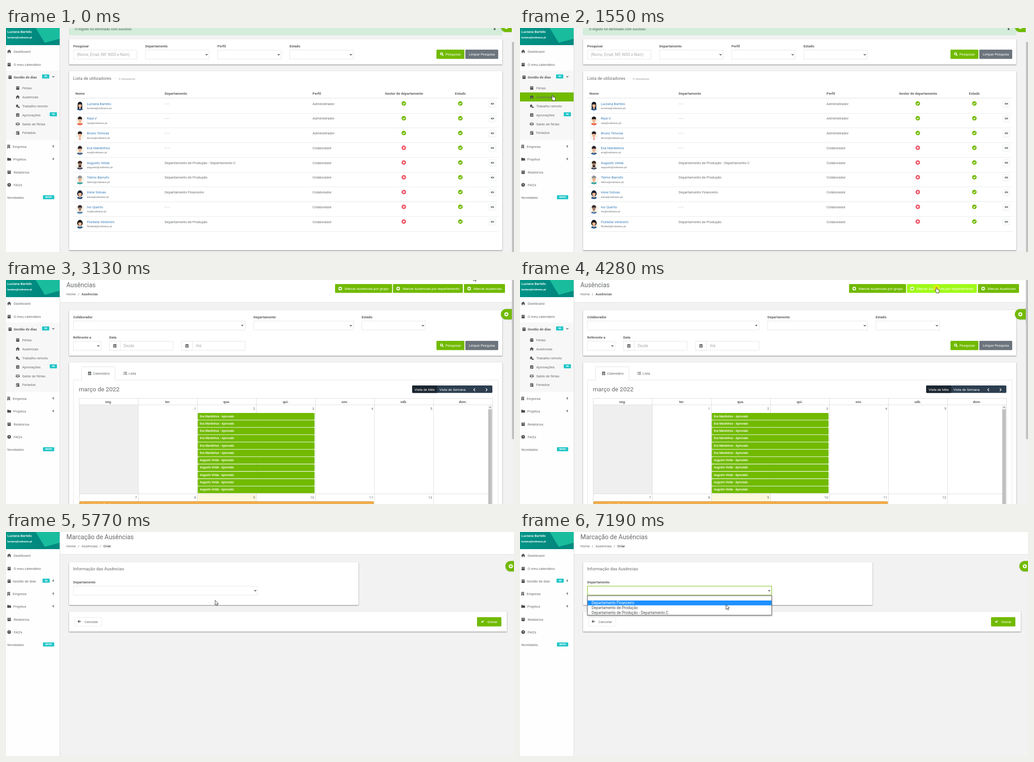
An HTML page with a canvas that plays this animation: 1127 px wide and 497 px high, repeating every 8000 ms.

```html
<!DOCTYPE html>
<html lang="pt">
<head>
<meta charset="utf-8">
<title>Gestão de ausências</title>
<style>
html, body { margin: 0; width: 100%; height: 100%; overflow: hidden; background: #f2f2f2; }
canvas { display: block; }
</style>
</head>
<body>
<canvas id="stage" width="1127" height="497"></canvas>
<script>
const ctx = document.getElementById('stage').getContext('2d');
const LOOP = 8000;
const GREEN = '#71ba00', GREY = '#676a6c', DARK = '#4d5052', TEAL = '#23c6c8', LINE = '#e5e6e7', LINK = '#337ab7';

const USERS = [
  // name, mail, department, profile, hair, shirt, hair style
  ['Luciana Bartelo', 'luciana', '- - -', 'Administrador', '#161c28', '#1d4e89', 'long'],
  ['Raul V', 'raul', '- - -', 'Administrador', '#1d1a1e', '#ee5a45', 'short'],
  ['Bruno Teivosa', 'bruno', '- - -', 'Administrador', '#201c20', '#f4f4f4', 'tie'],
  ['Eva Mardinhos', 'eva', '- - -', 'Colaborador', '#2a2530', '#24578f', 'bun'],
  ['Augusto Velda', 'augusto', 'Departamento de Produção - Departamento C', 'Colaborador', '#3b2a25', '#3d4a5c', 'beard'],
  ['Telmo Barrufo', 'telmo', 'Departamento de Produção', 'Colaborador', '#8e9496', '#27a3a3', 'short'],
  ['Irene Solvas', 'irene', 'Departamento Financeiro', 'Colaborador', '#1a2030', '#1f4d86', 'curly'],
  ['Ivo Querto', 'ivo', '- - -', 'Colaborador', '#3a3032', '#4a7fb0', 'glasses'],
  ['Florbela Ventorim', 'florbela', 'Departamento de Produção', 'Colaborador', '#101218', '#1d5a8c', 'bob'],
];
const DOMAIN = '@vobrano.pt';

const CAL = 'M-3.5-3H-2.2V-4.2H-1V-3H1V-4.2H2.2V-3H3.5V4H-3.5ZM-3-1.2H3V-.5H-3Z';
const HOME = 'M-4.6 0L0-4L4.6 0H3.3V3.8H1V1H-1V3.8H-3.3V0Z';
const ICONS = {
  cal: CAL,
  home: HOME,
  calCheck: CAL + 'M-2 1.2L-.5 2.8L2.2 .6L1.6 0L-.5 1.6L-1.3 .6Z',
  calDay: CAL + 'M-2.4 .4H-.2V2.4H-2.4Z',
  grid: CAL + 'M-2.4 .2H-1V1.3H-2.4ZM-.6 .2H.6V1.3H-.6ZM1 .2H2.4V1.3H1ZM-2.4 2H-1V3H-2.4ZM-.6 2H.6V3H-.6ZM1 2H2.4V3H1Z',
  remote: 'M-4.6-.4L-1.2-3.6L2.2-.4H1V1H-.4V2.6H-3.6V-.4ZM.4 1.4H4V3.2H4.8V4H-.4V3.2H.4Z',
  scale: 'M-4-3H4V-2.2H.5V3H2.5V3.8H-2.5V3H-.5V-2.2H-4ZM-4.8 1L-3-2L-1.2 1A1.8 1.3 0 0 1-4.8 1ZM1.2 1L3-2L4.8 1A1.8 1.3 0 0 1 1.2 1Z',
  building: 'M-3-4H3V4H1V2H-1V4H-3ZM-2-3H-.6V-1.8H-2ZM.6-3H2V-1.8H.6ZM-2-1H-.6V.4H-2ZM.6-1H2V.4H.6Z',
  folder: 'M-4.2-3H-1L0-2H4.2V3.3H-4.2Z',
  box: 'M-4-3.5H4V-1.6H-4ZM-3.6-1H3.6V3.7H-3.6ZM-1.2-.2V.6H1.2V-.2Z',
  list: 'M-4-3H-2.6V-1.8H-4ZM-1.8-2.9H4V-1.9H-1.8ZM-4-.6H-2.6V.6H-4ZM-1.8-.5H4V.5H-1.8ZM-4 1.8H-2.6V3H-4ZM-1.8 1.9H4V2.9H-1.8Z',
  eye: 'M-4 0Q0-4.4 4 0Q0 4.4-4 0ZM-1.7 0A1.7 1.7 0 0 0 1.7 0A1.7 1.7 0 0 0-1.7 0ZM-.8 0A.8 .8 0 0 0 .8 0A.8 .8 0 0 0-.8 0Z',
};
const GLYPHS = {
  plus: 'M-2.6 0H2.6M0-2.6V2.6',
  check: 'M-2.4 .1L-.7 1.8L2.5-1.5',
  cross: 'M-1.7-1.7L1.7 1.7M1.7-1.7L-1.7 1.7',
  down: 'M-2.3-1.1L0 1.2L2.3-1.1',
  left: 'M1.1-2.3L-1.2 0L1.1 2.3',
  right: 'M-1.5-3L1.5 0L-1.5 3',
  prev: 'M1.5-3L-1.5 0L1.5 3',
  arrow: 'M3.3 0H-3M-.3-2.8L-3.1 0L-.3 2.8',
  search: 'M1.5-.7A2.3 2.3 0 1 1-3.1-.7A2.3 2.3 0 1 1 1.5-.7M.9 .9L3.4 3.4',
};
const ARROW = new Path2D('M0 0V10.6L2.5 8.3L4.2 12L5.9 11.2L4.3 7.7H7.4Z');
const HAND = new Path2D('M-1.2 6.5V.9A1.1 1.1 0 0 1 1 .9V4L5 4.8Q6.3 5.2 6.1 7L5.4 11V12.5H0V11L-3.2 7.2Q-3.4 5.7-2 6.2Z');

// pointer path: time, x, y
const POINTER = [
  [220, 280, 500], [600, 149, 70.5], [680, 149, 70.5], [920, 62, 138], [1080, 62, 138],
  [1150, 66, 145], [1310, 66, 145], [1400, 70, 139], [1550, 72.5, 149], [2730, 72.5, 149],
  [3130, 1037, -9], [3200, 1037, -9], [3520, 900, 15], [3580, 900, 15], [3660, 924, 16.5],
  [5500, 924, 16.5], [5770, 464, 151.5], [5850, 464, 151.5], [6120, 472, 132], [6320, 472, 132],
  [6640, 461, 162.5], [6780, 460, 162.5], [6950, 459.5, 163], [7180, 459.5, 163], [7190, 457, 161],
];

let fontsReady = true;

function rect(x0, y0, x1, y1, fill, radius = 0, stroke) {
  ctx.beginPath();
  ctx.roundRect(x0, y0, x1 - x0, y1 - y0, radius);
  if (fill) { ctx.fillStyle = fill; ctx.fill(); }
  if (stroke) { ctx.strokeStyle = stroke; ctx.lineWidth = 1; ctx.stroke(); }
}
function outline(x0, y0, x1, y1, stroke = LINE, fill = '#fff', radius = 0) {
  rect(x0 + .5, y0 + .5, x1 - .5, y1 - .5, fill, radius, stroke);
}
function card(x0, y0, x1, y1) {
  ctx.save();
  ctx.shadowColor = 'rgba(0,0,0,.5)';
  ctx.shadowBlur = 2;
  ctx.shadowOffsetY = 1;
  rect(x0, y0, x1, y1, '#fff');
  ctx.restore();
}
function shape(points, fill) {
  ctx.beginPath();
  points.forEach(([x, y]) => ctx.lineTo(x, y));
  ctx.fillStyle = fill;
  ctx.fill();
}
function ellipse(x, y, rx, ry, fill) {
  ctx.beginPath();
  ctx.ellipse(x, y, rx, ry, 0, 0, 7);
  ctx.fillStyle = fill;
  ctx.fill();
}
function say(str, x, y, { size = 7.75, color = GREY, weight = 400, align = 'left' } = {}) {
  if (!fontsReady) return;
  ctx.font = `${weight} ${size}px Roboto, sans-serif`;
  ctx.fillStyle = color;
  ctx.textAlign = align;
  ctx.fillText(str, x, y + size * .35);
}
const bold = (str, x, y, more) => say(str, x, y, { weight: 700, color: '#5d6062', ...more });

function at(x, y, draw) {
  ctx.save();
  ctx.translate(x, y);
  draw();
  ctx.restore();
}
function icon(name, x, y, color = DARK) {
  if (!fontsReady) return;
  at(x, y, () => { ctx.fillStyle = color; ctx.fill(new Path2D(ICONS[name]), 'evenodd'); });
}
function glyph(name, x, y, color = '#333', width = 1.3) {
  at(x, y, () => { ctx.strokeStyle = color; ctx.lineWidth = width; ctx.stroke(new Path2D(GLYPHS[name])); });
}
function disc(name, x, y, r, fill, color) {
  if (!fontsReady) return;
  ellipse(x, y, r, r, fill);
  glyph(name, x, y, color, 1.4);
}
function badge(str, x0, y0, x1) {
  rect(x0, y0, x1, y0 + 9, TEAL, 1);
  say(str, (x0 + x1) / 2, y0 + 4.5, { size: 5.4, weight: 700, color: '#fff', align: 'center' });
}
function field(x0, y0, x1, chevron = true, border = LINE) {
  outline(x0, y0, x1, y0 + 21, border);
  if (chevron) glyph('down', x1 - 6, y0 + 10.5);
}
function searchButtons(y) {
  rect(955, y, 1017, y + 20.5, GREEN, 1.5);
  if (fontsReady) glyph('search', 967, y + 10, '#fff', 1.5);
  say('Pesquisar', 975, y + 10, { color: '#fff' });
  rect(1019, y, 1092, y + 20.5, '#6c757d', 1.5);
  say('Limpar Pesquisa', 1027, y + 10, { color: '#fff' });
}
function floatingAdd(x, y, right) {
  ctx.save();
  ctx.shadowColor = 'rgba(0,0,0,.3)';
  ctx.shadowBlur = 2;
  rect(x - 12, y - 11.5, right + 12, y + 11.5, GREEN, 11.5);
  ctx.restore();
  disc('plus', x, y, 4.6, '#fff', GREEN);
}
function scrollbar(y0, y1) {
  rect(1122, 0, 1127, 497, '#f1f1f1');
  rect(1122.5, y0, 1127, y1, '#c1c1c1');
}

function sidebar(open, pointer) {
  rect(0, 0, 119, 497, '#fefefe');
  rect(119, 0, 120, 497, '#dcdcdc');
  const teal = ctx.createLinearGradient(0, 0, 119, 38);
  teal.addColorStop(0, '#009688');
  teal.addColorStop(1, '#007f78');
  rect(0, 0, 119, 38, teal);
  shape([[66, 0], [86, 33], [119, 24], [119, 0]], '#19bc9d');
  shape([[86, 33], [119, 24], [119, 38], [89, 38]], '#008a80');
  say(USERS[0][0], 3, 8, { weight: 500, color: '#fff' });
  say(USERS[0][1] + DOMAIN, 3, 20.5, { weight: 700, size: 6.1, color: '#fff' });

  icon('home', 7, 52);
  say('Dashboard', 17, 52);
  icon('cal', 7, 81);
  say('O meu calendário', 17, 81);
  if (open) {
    rect(0, 94, 119, 248.5, '#f7f7f7');
    icon('cal', 9, 109);
    bold('Gestão de dias', 17, 109);
    badge('46', 80, 103, 96);
    glyph('down', 105, 108, DARK);
    const items = [['cal', 'Férias'], ['home', 'Ausências'], ['remote', 'Trabalho remoto'],
      ['calCheck', 'Aprovações'], ['scale', 'Saldo de férias'], ['calDay', 'Feriados']];
    items.forEach(([name, label], i) => {
      const y = 133 + i * 19.95;
      const hovered = pointer && pointer.x < 119 && Math.floor((pointer.y - 123) / 20) === i;
      if (hovered) rect(0, 123 + i * 20, 119, 143 + i * 20, GREEN);
      icon(name, 26, y);
      say(label, 36, y);
    });
    badge('46', 97, 187, 113);
  } else {
    icon('cal', 7, 109);
    say('Gestão de dias', 15, 109);
    badge('46', 81, 103.5, 97);
    glyph('left', 105, 108, DARK);
  }
  const y = open ? 263 : 137;
  icon('building', 6, y);
  say('Empresa', 15, y);
  icon('folder', 7, y + 28);
  say('Projetos', 16, y + 28);
  glyph('left', 105, y - .5, DARK);
  glyph('left', 105, y + 27.5, DARK);
  icon('box', 7, y + 57);
  say('Relatórios', 17, y + 57);
  if (fontsReady) ellipse(7, y + 85, 4, 4, DARK);
  say('?', 7, y + 85, { size: 6, weight: 700, color: '#fff', align: 'center' });
  say("FAQ's", 17, y + 85);
  say('Novidades', 3, y + 113.5);
  badge('NOVO', 82, y + 108, 107);
}

function avatar(x, y, hair, shirt, style) {
  const skin = '#efb894';
  ctx.save();
  ctx.beginPath();
  ctx.arc(x, y, 10, 0, 7);
  ctx.fillStyle = '#f6f5ee';
  ctx.fill();
  ctx.clip();
  if (style === 'long') rect(x - 5, y - 8, x + 5, y + 7, hair, [5, 5, 2, 2]);
  if (style === 'bob' || style === 'curly') ellipse(x, y - 2, 6, 6.2, hair);
  if (style === 'bun') ellipse(x, y - 8, 2.2, 2.2, hair);
  ellipse(x, y + 10, 8, 5, shirt);
  rect(x - 1.5, y + 2, x + 1.5, y + 7, skin);
  ellipse(x, y - 5, 4.7, 4.3, hair);
  ellipse(x, y - 1, 3.7, 4.9, skin);
  rect(x - 3.7, y - 7, x + 3.7, y - 3.6, hair, [3, 3, 1, 1]);
  if (style === 'tie') shape([[x, y + 5], [x + 1.4, y + 10], [x - 1.4, y + 10]], '#e9573f');
  if (style === 'beard') ellipse(x, y + 2.4, 3.3, 2.3, hair);
  if (style === 'glasses') rect(x - 2, y + .8, x + 2, y + 1.9, hair);
  if (style === 'glasses' || style === 'beard') rect(x - 3.2, y - 2.2, x + 3.2, y - 1, '#444');
  ctx.restore();
}

function usersPage(pointer) {
  outline(140, -20, 1101, 15.5, '#c3e6cb', '#d4edda');
  say('O registo foi eliminado com sucesso', 153, 2.2, { color: '#4c5f52' });
  glyph('cross', 1084, 2.5, '#444', 1.5);
  floatingAdd(1110, -2.5, 1122);
  scrollbar(31, 497);

  card(140, 25, 1101, 81);
  ['Pesquisar', 'Departamento', 'Perfil', 'Estado'].forEach((label, i) => {
    bold(label, 149 + i * 160, 40);
    field(149 + i * 160, 48.5, 291 + i * 160, i > 0);
  });
  say('(Nome, Email, NIF, NISS e Núm)', 157, 59, { size: 8.4, color: '#a9abad' });
  searchButtons(48);

  card(140, 96, 1101, 493);
  say('Lista de utilizadores', 149, 111.5, { size: 9.5 });
  say('•', 241, 112, { size: 6, color: '#aaa' });
  say('9 Utilizadores', 250, 112.5, { size: 6.1, color: '#999' });
  bold('Nome', 154, 145.5);
  bold('Departamento', 352, 145.5);
  bold('Perfil', 680, 145.5);
  bold('Gestor de departamento', 883, 145.5, { align: 'center' });
  bold('Estado', 1008, 145.5, { align: 'center' });
  rect(149, 155, 1092, 156, '#dedede');
  USERS.forEach(([name, mail, department, profile, hair, shirt, style], i) => {
    const y = 168 + i * 32.75, top = y - 12, bottom = y + 20.5;
    if (pointer && pointer.x > 149 && pointer.y > top && pointer.y < bottom) rect(149, top, 1092, bottom, '#f5f5f5');
    rect(149, Math.round(bottom), 1092, Math.round(bottom) + 1, '#e7eaec');
    avatar(164, y + 5, hair, shirt, style);
    say(name, 179.5, y, { color: LINK });
    say(mail + DOMAIN, 179.5, y + 10, { size: 6.2 });
    say(department, 352, y);
    say(profile, 680, y);
    if (i < 3) disc('check', 882.5, y - .5, 5, GREEN, '#fff');
    else disc('cross', 882.5, y - .5, 5, '#ed5565', '#fff');
    disc('check', 1008, y - .5, 5, GREEN, '#fff');
    outline(1071, Math.round(y) - 7, 1087, Math.round(y) + 8, '#e7eaec', '#fff', 1);
    icon('eye', 1079, y);
  });
}

function pageHead(title, crumbs, right) {
  rect(120, 0, right, 49, '#fff');
  rect(120, 49, right, 50, '#e2e3e4');
  say(title, 134, 11.5, { size: 14 });
  crumbs.forEach(([x, label], i) => {
    const draw = i === crumbs.length - 1 ? bold : say;
    if (i) say('/', x - 8, 31);
    draw(label, x, 31);
  });
}

function calendar() {
  card(140, 183, 1101, 510);
  rect(149, 221.5, 150, 497, LINE);
  rect(1091, 221.5, 1092, 497, LINE);
  rect(149, 221.5, 1092, 222.5, LINE);
  outline(167, 192, 242.5, 226, '#dee2e6', '#fff', 2);
  rect(166, 222.5, 244, 228, '#fff');
  icon('grid', 185.5, 207);
  say('Calendário', 193, 207);
  icon('list', 264.5, 207);
  say('Lista', 272, 207);
  say('março de 2022', 161.5, 242, { size: 13.5 });
  rect(901, 234, 1079, 250.5, '#2c3e50', 2);
  rect(901, 234, 956.5, 250.5, '#1a252f', [2, 0, 0, 2]);
  say('Vista de Mês', 906.5, 243, { color: '#fff' });
  say('Vista de Semana', 961.5, 243, { color: '#fff' });
  glyph('prev', 1039, 243.5, '#fff');
  glyph('right', 1066, 243.5, '#fff');

  rect(162, 277, 293, 474, '#efefef');
  rect(424, 474, 555, 497, '#fcf8dd');
  [262, 276.5, 474].forEach(y => rect(162, y, 1079, y + 1, '#ddd'));
  const days = ['seg.', 'ter.', 'qua.', 'qui.', 'sex.', 'sáb.', 'dom.'];
  for (let i = 0; i <= 7; i++) rect(162 + i * 131, 262, 163 + i * 131, 497, '#ddd');
  days.forEach((day, i) => {
    const right = 290.5 + i * 131;
    bold(day, 227.5 + i * 131, 270, { align: 'center' });
    if (i > 0 && i < 6) say(i, right, 285.5, { align: 'right' });
    if (i < 6) say(i + 7, right, 482.5, { align: 'right' });
  });
  rect(1069, 277, 1078.5, 497, '#f1f1f1');
  rect(1070, 287, 1078, 497, '#c1c1c1');
  shape([[1071.5, 283.5], [1074, 281], [1076.5, 283.5]], '#777');
  for (let i = 0; i < 11; i++) {
    const y = 295 + i * 16.27;
    rect(425.5, y, 684.5, y + 15.2, GREEN, 1.5);
    say(`${USERS[i < 6 ? 3 : 4][0]} - Aprovado`, 430, y + 7.3, { size: 6.5, weight: 500, color: '#fff' });
  }
  outline(163, 491, 816, 507, '#d99a3a', '#f0ad4e', 1.5);
  say(`${USERS[4][0]} - Pendente`, 168, 498.5, { size: 6.5, weight: 500, color: '#fff' });
}

function absencesPage(t) {
  pageHead('Ausências', [[134, 'Home'], [167.5, 'Ausências']], 1122);
  const flash = t < 4280 ? 0 : Math.max(0, 1 - (t - 4280) / 320);
  const lit = `rgb(${113 + 47 * flash},${186 + 64 * flash},${24 * flash})`;
  [[730, 856.5, 'por grupo'], [858.5, 1013.5, 'por departamento'], [1016, 1107, '']].forEach(([x0, x1, tail], i) => {
    rect(x0, 9, x1, 28.5, i === 1 ? lit : GREEN, 1.5);
    disc('plus', x0 + 11.5, 19, 4, '#fff', GREEN);
    say(`Marcar Ausências ${tail}`.trim(), x0 + 21.5, 19, { color: '#fff' });
  });
  if (flash) ellipse(924, 17.5, 7, 7, `rgba(235,235,0,${.8 * flash})`);
  scrollbar(0, 353);

  card(140, 67, 1101, 168);
  bold('Colaborador', 149, 82);
  bold('Departamento', 549, 82);
  bold('Estado', 789, 82);
  field(149, 90.5, 531, false);
  shape([[521.5, 99.5], [527, 99.5], [524.2, 103]], '#666');
  field(549, 90.5, 771);
  field(789, 90.5, 931);
  bold('Referente a', 149, 127);
  bold('Data', 229, 127);
  field(149, 135.5, 211);
  [[229, 'Desde'], [389, 'Até']].forEach(([x, hint]) => {
    field(x, 135.5, x + 142, false);
    field(x, 135.5, x + 25, false);
    icon('grid', x + 12.5, 146);
    say(hint, x + 32, 146, { size: 8.4, color: '#a9abad' });
  });
  searchButtons(135);
  floatingAdd(1110, 76, 1122);
  if (t >= 2420) calendar();
  rect(1122, 60, 1127, 95, '#c1c1c1');
}

function createPage(t, pointer) {
  pageHead('Marcação de Ausências', [[134, 'Home'], [167.5, 'Ausências'], [216, 'Criar']], 1127);
  floatingAdd(1120, 76, 1140);
  card(140, 67, 782, 162);
  say('Informação das Ausências', 149, 82, { size: 9.5 });
  bold('Departamento', 149, 111);
  const open = t >= 6200;
  field(149, 119.5, 559, true, open ? GREEN : LINE);

  card(140, 177, 1111, 221);
  outline(152, 189, 213, 209.5, '#e7eaec', '#fff', 1.5);
  if (fontsReady) glyph('arrow', 163, 198.5, DARK);
  say('Cancelar', 174, 199);
  rect(1045, 189, 1099, 209.5, GREEN, 1.5);
  if (fontsReady) glyph('check', 1057, 198.5, '#fff', 1.8);
  say('Gravar', 1068, 199, { color: '#fff' });

  if (!open) return;
  ctx.save();
  ctx.shadowColor = 'rgba(0,0,0,.3)';
  ctx.shadowBlur = 3;
  ctx.shadowOffsetY = 1;
  outline(149, 140.5, 559, 185, '#666');
  ctx.restore();
  const picked = Math.max(0, Math.floor((pointer.y - 141) / 10.7));
  ['', 'Departamento Financeiro', 'Departamento de Produção', 'Departamento de Produção - Departamento C'].forEach((option, i) => {
    const y = 141.3 + i * 10.7;
    if (i === picked) rect(150, y, 558, y + 10.7, '#1e90ff');
    say(option, 159, y + 5.3, { size: 8.4, color: i === picked ? '#fff' : '#4a4d50' });
  });
}

function pointerAt(t) {
  if (t < POINTER[0][0]) return null;
  const next = POINTER.findIndex(key => key[0] > t);
  if (next < 0) { const [, x, y] = POINTER.at(-1); return { x, y }; }
  const [t0, x0, y0] = POINTER[next - 1], [t1, x1, y1] = POINTER[next];
  const u = (t - t0) / (t1 - t0), k = u * u * (3 - 2 * u);
  return { x: x0 + (x1 - x0) * k, y: y0 + (y1 - y0) * k };
}

function drawPointer({ x, y }, page) {
  const onLink = page < 3 && x < 119 || page === 2 && x > 730 && x < 1107 && y > 9 && y < 28;
  const path = onLink ? HAND : ARROW;
  at(x, y, () => {
    ctx.fillStyle = '#fff';
    ctx.strokeStyle = '#222';
    ctx.lineWidth = .9;
    ctx.fill(path);
    ctx.stroke(path);
  });
}

function frame() {
  const t = performance.now() % LOOP;
  const page = t < 2180 ? 1 : t < 4830 ? 2 : 3;
  const pointer = pointerAt(t);
  // text and icons show up only once a freshly opened page has its fonts
  fontsReady = page === 1 || page === 2 && t >= 2730 || t >= 5240;
  rect(0, 0, 1127, 497, '#f2f2f2');
  if (page === 1) usersPage(pointer);
  if (page === 2) absencesPage(t);
  if (page === 3) createPage(t, pointer);
  sidebar(page < 3, pointer);
  if (pointer) drawPointer(pointer, page);
  requestAnimationFrame(frame);
}
frame();
</script>
</body>
</html>
```
